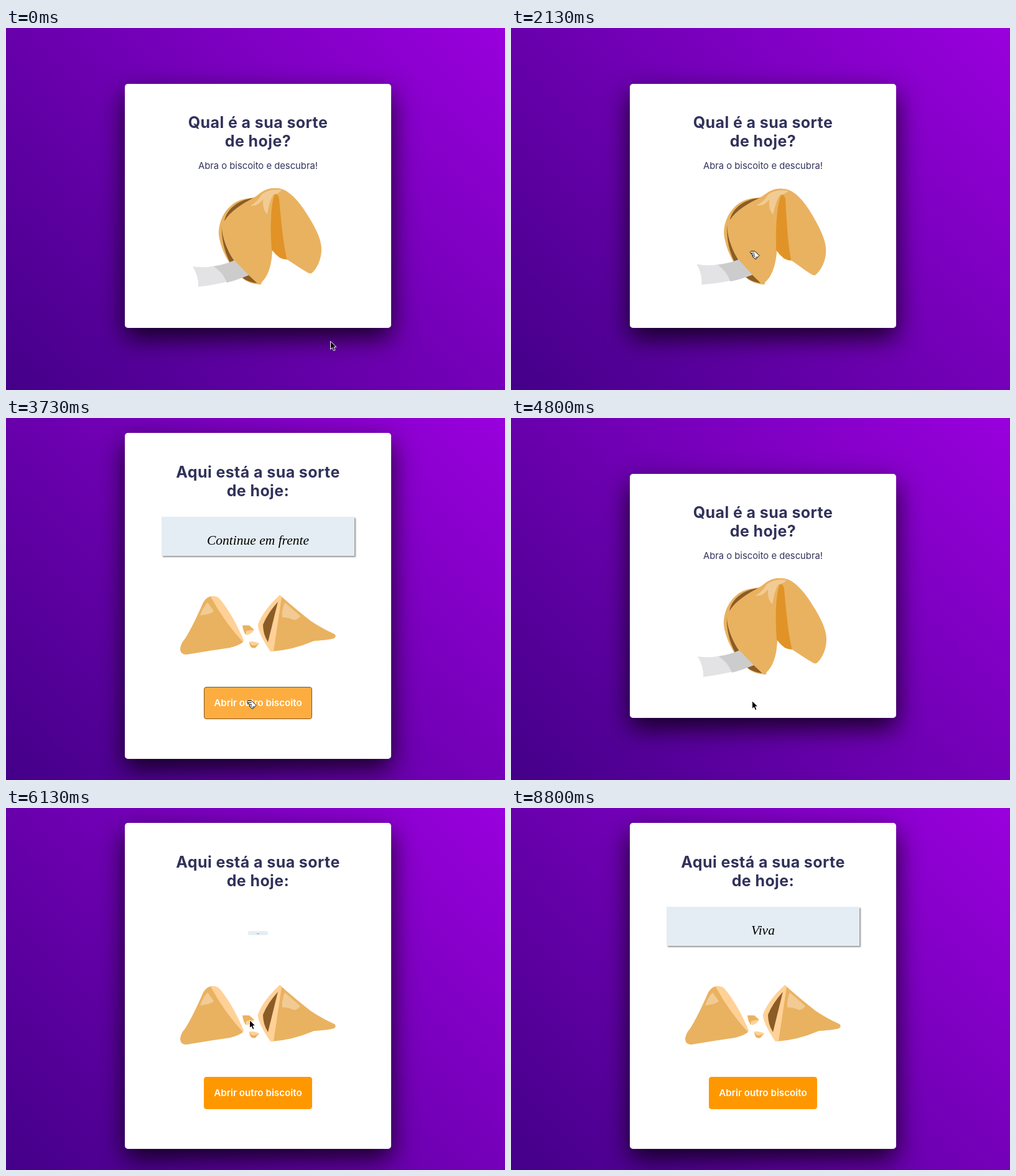
Animation, 802 px wide and 583 px high, one loop 9190 ms. Source, as an HTML page:

```html
<!DOCTYPE html>
<html lang="pt-BR">
<head>
<meta charset="utf-8">
<title>Biscoito da sorte</title>
<style>
html, body { margin: 0; width: 100%; height: 100%; overflow: hidden; }
body { position: relative; background: linear-gradient(45deg, #440088, #9900dd); }
.screen, svg { position: absolute; left: 0; top: 0; width: 802px; height: 583px; }
.card {
  position: absolute; left: 191px; width: 428px;
  background: #fff; border-radius: 5px;
  box-shadow: 0 16px 40px rgba(0, 0, 0, .8);
}
#closed .card { top: 90px; height: 393px; }
#open .card { top: 24px; height: 525px; }
text { text-anchor: middle; font-family: Inter, sans-serif; fill: #31325a; }
.title { font-size: 25px; font-weight: 700; letter-spacing: .4px; }
.sub { font-size: 14.8px; }
.label { font-size: 15.2px; font-weight: 600; fill: #fff; }
.tan { fill: #e9b260; }
.light { fill: #ffd197; }
.shine { fill: #f2cb94; }
.brown { fill: #8b5c25; }
#cookie { transform-origin: 405px 337.5px; }
#button { fill: #ff9800; }
#button.hover { fill: #fdad40; stroke: #80571c; }
#note {
  position: absolute; left: 250px; top: 159px; width: 310px; height: 63px;
  background: #e4edf3; box-shadow: 2px 2px 2px rgba(0, 0, 0, .4);
  font: italic 21.5px/76px "Liberation Serif", "Noto Serif", serif;
  color: #000; text-align: center;
}
</style>
</head>
<body>
<div class="screen" id="closed">
  <div class="card"></div>
  <svg viewBox="0 0 802 583">
    <text class="title" x="405" y="161">Qual é a sua sorte</text>
    <text class="title" x="405" y="191">de hoje?</text>
    <text class="sub" x="405" y="227">Abra o biscoito e descubra!</text>
    <g id="cookie">
      <path class="tan" d="M434 258C420 257 410 264 404 270C398 275 385 273 372 279C352 289 341 312 342 333C344 352 357 385 384 406C392 411 402 413 410 413L411 408L428 358Z"/>
      <path class="brown" d="M347 319C345 345 357 388 384 405Q393 410 404 411L389 397L366 374C355 358 348 338 347 319Z"/>
      <path fill="#e3e3e5" d="M300 384Q320 387 335 383Q352 381 368 374L390 398Q352 412 309 417Q310 400 300 384Z"/>
      <path fill="#ccc" d="M334 384Q352 381 368 374L390 398Q372 406 355 410Q349 394 334 384Z"/>
      <path class="tan" d="M347 319C352 302 372 288 398 274C410 264 420 257 434 258L428 300L428 358C427 385 420 402 410 410L404 411L389 397L367 374C354 354 347 337 347 319Z"/>
      <path class="brown" d="M351 311C354 292 374 276 397 274C380 283 360 295 351 311Z"/>
      <path fill="#e19327" d="M432 268Q438 266 440 275L452 373Q446 373 440 370Q432 364 427 357C424 320 426 280 432 268Z"/>
      <path class="tan" d="M434 258C455 257 475 284 490 310C500 327 507 342 507 357C507 372 500 388 491 395Q488 396 485 394C474 388 462 379 452 373C446 350 443 320 439 275Q437 266 432 268Z"/>
      <path class="shine" d="M393 286Q404 280 411 268Q424 258 443 261Q440 266 430 268Q424 276 420 300Q412 293 413 276Q404 288 393 286Z"/>
    </g>
  </svg>
</div>

<div class="screen" id="open">
  <div class="card"></div>
  <svg viewBox="0 0 802 583">
    <text class="title" x="405" y="96">Aqui está a sua sorte</text>
    <text class="title" x="405" y="126">de hoje:</text>
    <path class="tan" d="M331 287Q323 287 317 297Q300 336 288 355Q280 364 280 373Q281 381 290 381Q325 375 360 370Q375 366 381 361L340 290Z"/>
    <path class="light" d="M329 288Q337 284 345 293Q365 318 382 358L381 361Q352 330 329 288Z"/>
    <path class="shine" d="M324 297L334 311Q330 316 312 318Q316 306 324 297Z"/>
    <path class="tan" d="M440 285Q462 305 490 327Q508 339 528 348Q532 352 527 355Q515 358 495 359Q460 374 426 376Z"/>
    <path class="light" d="M440 285Q414 309 405 332Q404 345 425 376L430 376L443 288Z"/>
    <path class="brown" d="M437 296L421 361Q413 348 413 333Q420 315 437 296Z"/>
    <path class="shine" d="M448 297L473 319Q468 326 462 325Q454 321 444 321Q443 310 448 297Z"/>
    <path class="tan" d="M380 334H391L399 341L386 344V350Q381 344 380 334Z"/>
    <path class="light" d="M386 343L399 341Q396 347 387 350Z"/>
    <path class="tan" d="M391 361L407 363L401 370Q392 373 391 361Z"/>
    <path class="light" d="M391 360Q399 359 407 363Q402 367 397 366Q393 366 391 360Z"/>
    <rect id="button" x="318.5" y="433.5" width="173" height="51" rx="3.5" stroke="#ff9800"/>
    <text class="label" x="405" y="464">Abrir outro biscoito</text>
  </svg>
  <div id="note"></div>
</div>

<svg viewBox="0 0 802 583">
  <g id="cursor" stroke-linejoin="round">
    <path id="arrow" stroke="#fff" d="M.5 .5V13.5L3.4 10.8L5.6 15.6L8 14.6L5.9 9.8H10Z"/>
    <g id="hand" fill="#fff" stroke="#000">
      <path d="M.5 1.5L1.5 .5H8L15 7.5L9.5 13.5L6.5 11.5L4.5 9.5L4 6L1 3.5Z"/>
      <path fill="none" d="M2 3.5H7.5M4.5 6.5H8M5.5 9H8.5M11.5 9L9 12"/>
    </g>
  </g>
</svg>

<script>
const LOOP = 9190, FPS = 15, NOTE_TIME = 1500;
const $ = id => document.getElementById(id);
const clamp = (v, lo, hi) => Math.min(hi, Math.max(lo, v));
const smooth = u => u * u * (3 - 2 * u);

// time, x, y, linear?
const path = [
  [0, 521, 504], [430, 521, 504], [1150, 384, 359], [2860, 384, 359],
  [3330, 387, 455], [4960, 387, 455], [5440, 391, 342], [5900, 391, 341],
  [7333, 391, 341], [7733, 389, 396, 1], [8200, 387, 590, 1],
  [8440, 387, 600], [8465, 317, 428], [8733, 140, 22, 1], [8780, -50, -50], [LOOP, -50, -50]
];
const openings = [
  { from: 2200, to: 4790, text: "Continue em frente" },
  { from: 6040, to: LOOP, text: "Viva" }
];

function cursorAt(t) {
  const i = path.findIndex(p => p[0] > t);
  const [t0, x0, y0] = path[i - 1], [t1, x1, y1, linear] = path[i];
  const u = (t - t0) / (t1 - t0), k = linear ? u : smooth(u);
  return [x0 + (x1 - x0) * k, y0 + (y1 - y0) * k];
}

// cubic-bezier(0, 0, .58, 1)
function easeOut(x) {
  let lo = 0, hi = 1;
  for (let i = 0; i < 20; i++) {
    const s = (lo + hi) / 2;
    if (1.74 * s * s - .74 * s ** 3 < x) lo = s; else hi = s;
  }
  return smooth(lo);
}

const sway = (t, start) => 2 * Math.sin(Math.PI * clamp((t - start) / 800, 0, 1)) ** 2;
const tilt = t =>
  t < 1800 ? sway(t, 800) :
  t < 4000 ? clamp((t - 2000) * FPS / 1000, 0, 2) : sway(t, 5270);

function draw(t) {
  const shown = openings.find(o => t >= o.from && t < o.to);
  const [x, y] = cursorAt(t);
  const within = (l, top, r, b) => x >= l && x <= r && y >= top && y <= b;
  const hover = shown ? within(318, 433, 492, 485) : within(300, 257, 510, 418);

  $("closed").style.display = shown ? "none" : "";
  $("open").style.display = shown ? "" : "none";
  $("cookie").style.transform = `rotate(${tilt(t)}deg)`;
  $("button").classList.toggle("hover", hover);
  if (shown) {
    const u = clamp((t - shown.from) / NOTE_TIME, 0, 1);
    $("note").textContent = shown.text;
    $("note").style.transform = u < 1 ? `translateY(${11 * (1 - u ** 2.5)}px) scale(${easeOut(u)})` : "none";
  }
  $("cursor").setAttribute("transform", `translate(${Math.round(x)} ${Math.round(y)})`);
  $("arrow").style.display = hover ? "none" : "";
  $("hand").style.display = hover ? "" : "none";
}

function tick() {
  const t = performance.now() % LOOP;
  draw(Math.floor(t * FPS / 1000 + .1) * 1000 / FPS % LOOP);
  requestAnimationFrame(tick);
}
tick();
</script>
</body>
</html>
```
